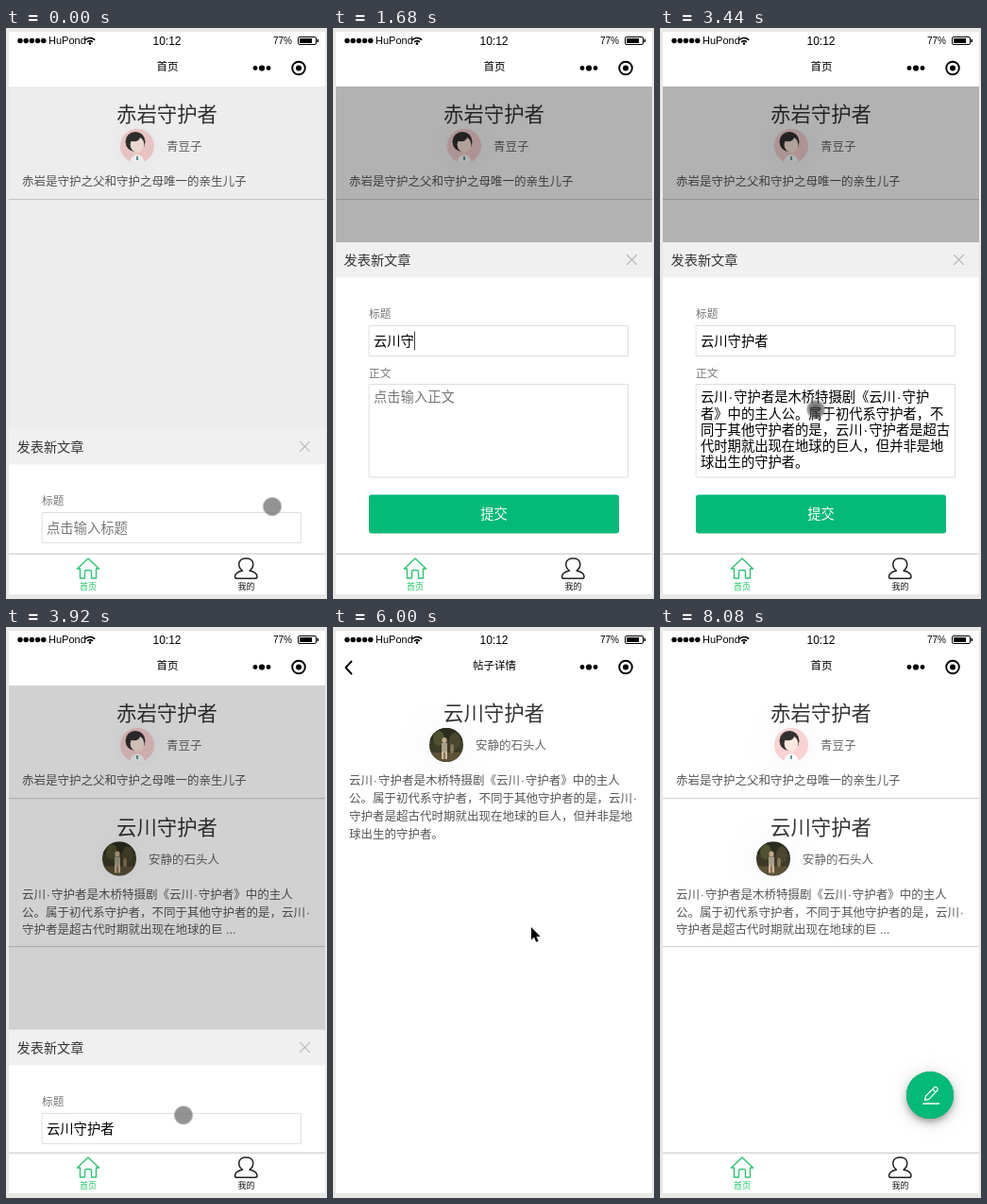
Recreate the animation shown at these times as an HTML page with a canvas. Size 340 by 605 pixels, loop 9.16 s.

```html
<!DOCTYPE html>
<html lang="zh-CN">
<head>
<meta charset="utf-8">
<title>发表文章</title>
<style>
html, body { margin: 0; width: 100%; height: 100%; overflow: hidden; background: #e8e8e6; }
canvas { display: block; width: 340px; height: 605px; }
</style>
</head>
<body>
<canvas id="stage"></canvas>
<script>
const W = 340, H = 605, LOOP = 9160, STEP = 80;
const LEFT = 3, RIGHT = 338, TOP = 62, TAB = 557, BOTTOM = 600;
const GREEN = '#04ba78', INK = '#333', SOFT = '#555';
const FONT = '"Liberation Sans", "Noto Sans CJK SC", "Noto Sans CJK", sans-serif';

const canvas = document.getElementById('stage');
const ctx = canvas.getContext('2d');
const dpr = window.devicePixelRatio || 1;
canvas.width = W * dpr;
canvas.height = H * dpr;

const first = {
  title: '赤岩守护者', author: '青豆子', avatarX: 139, nameX: 170, photo: false,
  lines: ['赤岩是守护之父和守护之母唯一的亲生儿子']
};
const second = {
  title: '云川守护者', author: '安静的石头人', avatarX: 120, nameX: 151, photo: true,
  lines: [
    '云川·守护者是木桥特摄剧《云川·守护者》中的主人',
    '公。属于初代系守护者，不同于其他守护者的是，云川·',
    '守护者是超古代时期就出现在地球的巨人，但并非是地',
    '球出生的守护者。'
  ]
};
const excerpt = { ...second, lines: [...second.lines.slice(0, 2), '守护者是超古代时期就出现在地球的巨 ...'] };
const draft = [
  '云川·守护者是木桥特摄剧《云川·守护',
  '者》中的主人公。属于初代系守护者，不',
  '同于其他守护者的是，云川·守护者是超古',
  '代时期就出现在地球的巨人，但并非是地',
  '球出生的守护者。'
];

// Times in ms
const TYPED = [1200, 1440, 1680, 1840, 2000];
const BODY_FOCUS = 2720, PASTE = 3040, CLOSE = 3840, NOTICE = 3920;
const PUSH = 5200, POP = 7040, SLIDE = 400;
const PRESSES = [640, 2720, 3440, 3760, 5120];
const PATH = [
  [0, 282, 507], [80, 282, 507], [640, 145, 325], [2480, 145, 325], [2720, 165, 404],
  [3440, 165, 404], [3760, 188, 517], [4480, 188, 519], [5040, 210, 318],
  [6000, 210, 318], [6800, 15, 42], [7360, 15, 42], [7840, -20, 60]
];

const clamp = u => Math.max(0, Math.min(1, u));
const easeOut = u => 1 - (1 - clamp(u)) ** 3;
const easeInOut = u => { u = clamp(u); return u * u * (3 - 2 * u); };

function box(x, y, w, h, color) {
  ctx.fillStyle = color;
  ctx.fillRect(x, y, w, h);
}

function disc(x, y, r, color) {
  ctx.fillStyle = color;
  ctx.beginPath();
  ctx.arc(x, y, r, 0, 7);
  ctx.fill();
}

function oval(x, y, rx, ry, color) {
  ctx.fillStyle = color;
  ctx.beginPath();
  ctx.ellipse(x, y, rx, ry, 0, 0, 7);
  ctx.fill();
}

function line(d, color, width) {
  ctx.strokeStyle = color;
  ctx.lineWidth = width;
  ctx.stroke(new Path2D(d));
}

// y is the visual middle of the line
function text(s, x, y, size, color, align = 'left', weight = 400) {
  ctx.font = `${weight} ${size}px ${FONT}`;
  ctx.fillStyle = color;
  ctx.textAlign = align;
  ctx.fillText(s, x, y + size * 0.38);
}

// Text whose middle dots sit in a half-width slot
function dotted(s, x, y, size, color) {
  const slot = size * 0.47;
  s.split('·').forEach((part, i) => {
    if (i) {
      text('·', x + slot / 2, y, size, color, 'center');
      x += slot;
    }
    text(part, x, y, size, color);
    x += ctx.measureText(part).width;
  });
}

function clipped(x, y, w, h, draw) {
  ctx.save();
  ctx.beginPath();
  ctx.rect(x, y, w, h);
  ctx.clip();
  draw();
  ctx.restore();
}

function statusBar() {
  for (let i = 0; i < 5; i++) disc(15 + i * 6.2, 13.5, 2.7, '#000');
  text('HuPond', 45, 13, 11, '#000');
  ctx.lineCap = 'butt';
  for (const r of [3.9, 7]) {
    ctx.beginPath();
    ctx.arc(89, 17.5, r, -Math.PI * 0.76, -Math.PI * 0.24);
    ctx.strokeStyle = '#000';
    ctx.lineWidth = 1.7;
    ctx.stroke();
  }
  disc(89, 16.6, 1.3, '#000');
  text('10:12', 170.5, 13, 12, '#000', 'center');
  text('77%', 283, 13.3, 10, '#000');
  ctx.strokeStyle = '#000';
  ctx.lineWidth = 1;
  ctx.beginPath();
  ctx.roundRect(309.5, 9.5, 19, 8, 1.5);
  ctx.stroke();
  box(311, 11, 13, 5, '#000');
  box(329.5, 12, 1.5, 3, '#000');
}

function navBar(title, back) {
  box(LEFT, 24, RIGHT - LEFT, TOP - 24, '#fff');
  text(title, 171, 41, 11.5, '#000', 'center', 500);
  disc(264, 42.5, 2.4, '#000');
  disc(271, 42.5, 3.1, '#000');
  disc(278, 42.5, 2.4, '#000');
  disc(310, 42.5, 3, '#000');
  ctx.strokeStyle = '#000';
  ctx.lineWidth = 1.9;
  ctx.beginPath();
  ctx.arc(310, 42.5, 6.8, 0, 7);
  ctx.stroke();
  if (back) {
    ctx.lineCap = ctx.lineJoin = 'round';
    line('M19.5 36.5 L13.5 43 L19.5 49.5', '#000', 1.9);
  }
}

function avatar(x, y, photo) {
  ctx.save();
  ctx.shadowColor = 'rgba(0,0,0,.05)';
  ctx.shadowBlur = 24 * dpr;
  disc(x, y, 18, photo ? '#3d3a28' : '#f9d2d3');
  ctx.restore();
  ctx.save();
  ctx.beginPath();
  ctx.arc(x, y, 18, 0, 7);
  ctx.clip();
  ctx.translate(x, y);
  if (photo) {
    box(-18, -18, 36, 13, '#2b2d1f');
    oval(-8, -7, 6, 8, '#4f5130');
    oval(9, -4, 6, 9, '#4a4630');
    box(-18, 8, 36, 10, '#5b5238');
    oval(-2, -5, 2.6, 3, '#c3ab8b');
    box(-5, -2, 6, 10, '#aaa08a');
    box(-5, 7, 2.4, 8, '#d0b697');
    box(-1.4, 7, 2.4, 8, '#d0b697');
    oval(6, 4, 2, 5, '#87765a');
  } else {
    oval(-2, -4.5, 10.5, 10.5, '#32302f');
    oval(0, -1.5, 7.4, 8.2, '#fbe8de');
    oval(-3.5, -9, 6.5, 4.2, '#32302f');
    box(-2, 6, 4, 5, '#f6dccf');
    oval(0, 17, 7.5, 7.5, '#fff');
    box(-1, 11, 2, 4, '#5f9f91');
  }
  ctx.restore();
}

function card(post, dy) {
  text(post.title, 170.5, 91 + dy, 21.4, INK, 'center');
  avatar(post.avatarX, 125 + dy, post.photo);
  text(post.author, post.nameX, 125.3 + dy, 12.5, '#666');
  post.lines.forEach((s, i) => dotted(s, 17, 162.5 + dy + i * 18.8, 12.5, SOFT));
}

function writeButton() {
  const x = 286, y = 496;
  for (const [dy, blur, alpha] of [[1, 18, 0.12], [6, 10, 0.14], [3, 5, 0.2]]) {
    ctx.save();
    ctx.shadowColor = `rgba(0,0,0,${alpha})`;
    ctx.shadowBlur = blur * dpr;
    ctx.shadowOffsetY = dy * dpr;
    disc(x, y, 25, GREEN);
    ctx.restore();
  }
  ctx.lineCap = ctx.lineJoin = 'round';
  line('M280.5 501.5 L281.5 497 L290.5 487.8 Q292 486.8 293.3 488 Q295 489.5 293.8 491 L284.8 500.3 Z M288.8 489.8 L292 493', '#fff', 1.2);
  line('M278.5 505 H295.5', '#fff', 1.4);
}

function tabBar() {
  box(LEFT, TAB, RIGHT - LEFT, BOTTOM - TAB, '#fff');
  box(LEFT, TAB - 0.5, RIGHT - LEFT, 1.5, '#d6d6d6');
  ctx.lineCap = ctx.lineJoin = 'round';
  line('M75.5 573 L87 562 L98.5 573 H95.5 V583 H90.5 V576 Q90.5 574.5 89 574.5 H85 Q83.5 574.5 83.5 576 V583 H78.5 V573 Z', '#2cc574', 1.4);
  text('首页', 87, 592, 9, '#17c563', 'center', 500);
  line('M250.5 575 C245 571 245 562 254.3 562 C263.5 562 263.5 571 258 575 C263 576 266 578.5 266 581.5 Q266 583.3 263.5 583.3 H245 Q242.5 583.3 242.5 581.5 C242.5 578.5 245.5 576 250.5 575', '#222', 1.5);
  text('我的', 254.5, 592, 9, '#111', 'center', 500);
}

function field(y, h) {
  ctx.strokeStyle = '#dedede';
  ctx.lineWidth = 1;
  ctx.strokeRect(38.5, y, 274, h);
}

function panel(t) {
  const size = 14.3, hint = '#777';
  box(LEFT, 227, RIGHT - LEFT, 340, '#fff');
  box(LEFT, 227, RIGHT - LEFT, 37.5, '#f0f0f0');
  text('发表新文章', 11.5, 245.8, 14.2, INK);
  ctx.lineCap = 'round';
  line('M311.5 240.5 L321.5 250.5 M321.5 240.5 L311.5 250.5', '#b8b8b8', 1.2);

  text('标题', 38, 303, 11.7, '#777', 'left', 500);
  field(315.5, 32);
  const count = TYPED.filter(at => t >= at).length;
  if (count) text(second.title.slice(0, count), 43, 331.5, size, '#000');
  else text('点击输入标题', 43, 331.5, size, hint);

  text('正文', 38, 365.5, 11.7, '#777', 'left', 500);
  field(377.5, 98.5);
  if (t >= PASTE) draft.forEach((s, i) => dotted(s, 43, 391 + i * 17.2, size, '#000'));
  else text('点击输入正文', 43, 391, size, hint);

  if (t >= 640 && t < BODY_FOCUS) box(43 + count * size, 321.5, 1, 20, '#333');
  else if (t >= BODY_FOCUS && t < PASTE) box(43, 382, 1, 18, '#333');

  ctx.fillStyle = GREEN;
  ctx.beginPath();
  ctx.roundRect(38, 494.5, 265, 41, 3);
  ctx.fill();
  text('提交', 170.5, 515, size, '#fff', 'center');
}

function homePage(t) {
  box(LEFT, TOP, RIGHT - LEFT, BOTTOM - TOP, '#fff');
  const opening = t < CLOSE;
  const open = opening ? easeOut((t + 47) / 300) : 1 - easeOut((t - CLOSE) / 300);
  const shade = opening ? clamp((t + 47) / 200) : 1 - clamp((t - CLOSE) / 200);

  clipped(LEFT, TOP, RIGHT - LEFT, TAB - TOP, () => {
    card(first, 0);
    box(LEFT, 181, RIGHT - LEFT, 1.2, '#d4d4d4');
    if (!opening) {
      card(excerpt, 120.5);
      box(LEFT, 338, RIGHT - LEFT, 1.2, '#d4d4d4');
    }
    writeButton();
    if (shade > 0) box(LEFT, TOP, RIGHT - LEFT, TAB - TOP, `rgba(0,0,0,${0.3 * shade})`);
    if (open > 0) {
      ctx.save();
      ctx.translate(0, (1 - open) * 330);
      panel(t);
      ctx.restore();
    }
    if (t >= NOTICE && t < POP - STEP) {
      const y = TOP - 30 * (1 - easeOut((t - NOTICE) / 240));
      box(LEFT, y, RIGHT - LEFT, 29.5, '#13ce66');
      text('发表文章成功', 170.5, y + 14.5, 12.5, '#fff', 'center');
    }
  });
  tabBar();
  navBar('首页', false);
}

function detailPage() {
  box(LEFT, 24, RIGHT - LEFT, BOTTOM - 24, '#fff');
  card(second, 0);
  navBar('帖子详情', true);
}

function pages(t) {
  const pushed = t < POP ? easeOut((t - PUSH) / SLIDE) : 1 - easeOut((t - POP) / SLIDE);
  const width = RIGHT - LEFT;
  clipped(LEFT, 24, width, BOTTOM - 24, () => {
    if (pushed < 1) {
      ctx.save();
      ctx.translate(-width * 0.3 * pushed, 0);
      homePage(t);
      ctx.restore();
    }
    if (pushed > 0) {
      ctx.save();
      ctx.translate(width * (1 - pushed), 0);
      detailPage();
      ctx.restore();
    }
  });
}

function pointerAt(t) {
  const i = PATH.findIndex(k => k[0] > t);
  if (i < 0) return PATH[PATH.length - 1].slice(1);
  const [t0, x0, y0] = PATH[i - 1], [t1, x1, y1] = PATH[i];
  const u = easeInOut((t - t0) / (t1 - t0));
  return [x0 + (x1 - x0) * u, y0 + (y1 - y0) * u];
}

function pointer(t) {
  if ((t >= 1040 && t < 2480) || t >= 7840) return;
  const [x, y] = pointerAt(t);
  if (t >= 5600) {
    const arrow = new Path2D('M0 0 V13.5 L3 10.8 L5.2 15.8 L7.6 14.8 L5.4 9.9 H9.6 Z');
    ctx.save();
    ctx.translate(x, y);
    ctx.lineJoin = 'round';
    ctx.strokeStyle = '#fff';
    ctx.lineWidth = 2;
    ctx.stroke(arrow);
    ctx.fillStyle = '#000';
    ctx.fill(arrow);
    ctx.restore();
  } else if (PRESSES.some(at => t >= at && t < at + STEP)) {
    const glow = ctx.createRadialGradient(x, y, 3, x, y, 10.5);
    glow.addColorStop(0, 'rgba(50,50,50,.75)');
    glow.addColorStop(0.7, 'rgba(80,80,80,.6)');
    glow.addColorStop(1, 'rgba(110,110,110,.1)');
    disc(x, y, 10.5, glow);
  } else {
    disc(x, y, 10.3, 'rgba(150,150,150,.5)');
    disc(x, y, 9.3, 'rgba(110,110,110,.6)');
  }
}

function render(now) {
  const t = Math.floor((now % LOOP) / STEP) * STEP;
  ctx.setTransform(dpr, 0, 0, dpr, 0, 0);
  box(0, 0, W, H, '#e8e8e6');
  box(LEFT, 4, RIGHT - LEFT, BOTTOM - 4, '#fff');
  pages(t);
  statusBar();
  pointer(t);
}

let start;
function tick(now) {
  start ??= now;
  render(now - start);
  requestAnimationFrame(tick);
}
render(0);
requestAnimationFrame(tick);
</script>
</body>
</html>
```
